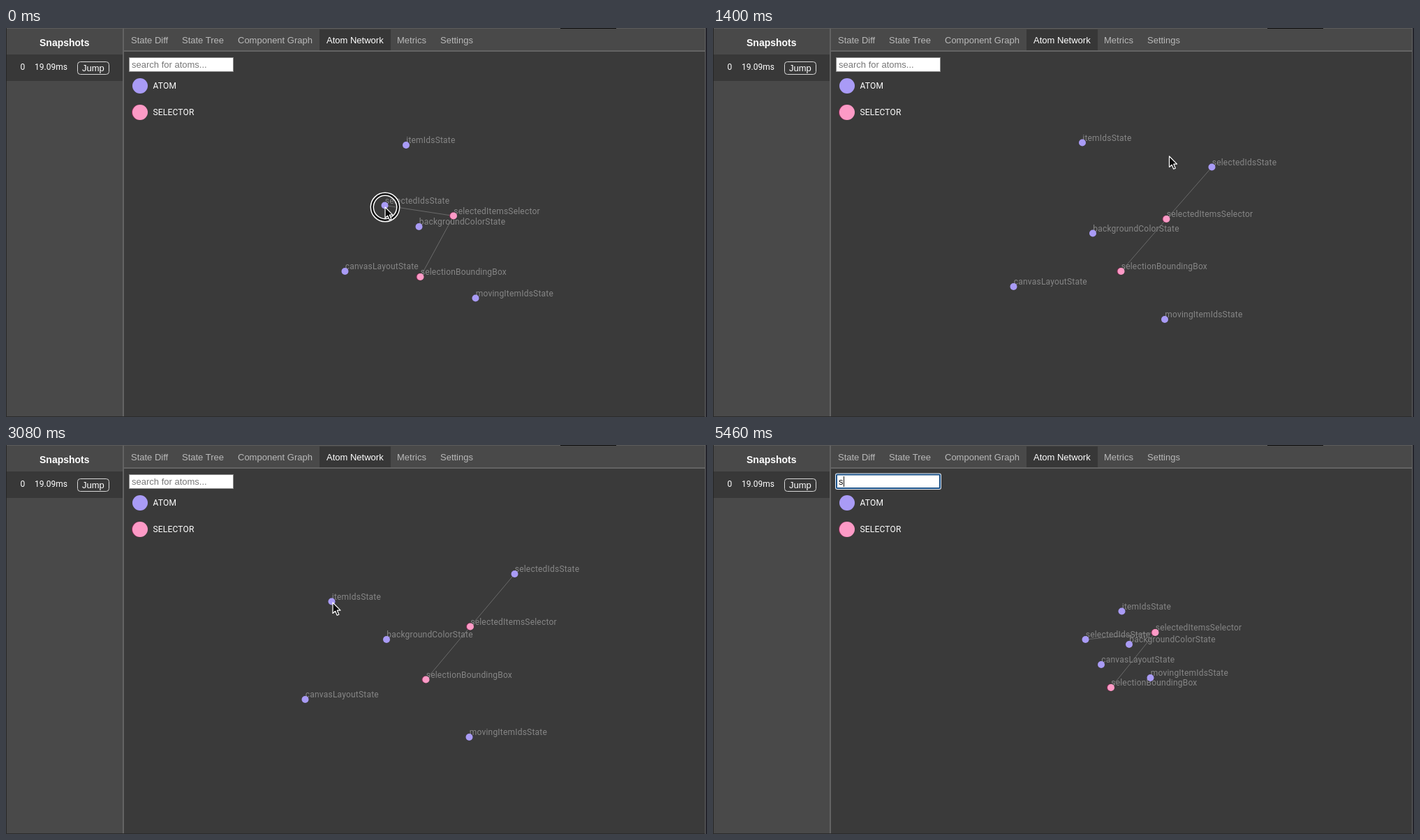
Recreate the animation shown at these times as an HTML page. Size 1004 px wide and 558 px high, loop 5530 ms.

```html
<!DOCTYPE html>
<html lang="en">
<head>
<meta charset="utf-8">
<title>Atom Network</title>
<style>
html, body { margin: 0; width: 100%; height: 100%; overflow: hidden; background: #3a3a3a; }
svg { display: block; width: 1004px; height: 558px; }
text { font: 13px "Liberation Sans", Arial, sans-serif; fill: #b9b9b9; white-space: pre; }
.on { fill: #fff; }
.head { font-weight: bold; font-size: 14px; fill: #fff; }
.small, .label { font: 12px Roboto, "Liberation Sans", sans-serif; fill: #fff; }
.key, .label { letter-spacing: .2px; }
.label { fill: #868686; }
.hint { fill: #777; }
.typed { fill: #111; }
.edge { stroke: #6a6a6a; stroke-width: 1; }
.atom { fill: #a99bf6; }
.sel { fill: #fd9ac6; }
.shade { fill: #8c2c58; }
</style>
</head>
<body>
<svg viewBox="0 0 1004 558">
  <rect width="1004" height="558" fill="#3a3a3a"/>
  <rect width="168" height="558" fill="#494949"/>
  <rect y="38" width="168" height="38" fill="#383838"/>
  <rect x="168" width="834" height="33" fill="#494949"/>
  <rect x="449" y="2" width="102" height="31" fill="#373737"/>
  <rect x="168" y="32" width="834" height="2" fill="#636363"/>
  <rect x="167" width="2" height="558" fill="#636363"/>
  <rect width="1004" height="1" fill="#5c5c5c"/>
  <rect x="794" width="80" height="1" fill="#0c0c0c"/>
  <rect width="1" height="558" fill="#262626"/>
  <rect y="557" width="1004" height="1" fill="#2b2b2b"/>
  <rect x="1001" width="1" height="558" fill="#636363"/>
  <rect x="1002" width="2" height="558" fill="#25252c"/>

  <text class="head" x="48" y="25.500">Snapshots</text>
  <text class="small" x="20.500" y="60">0</text>
  <text class="small" x="41" y="60">19.09ms</text>
  <rect x="102.500" y="48.500" width="45" height="18" rx="4" fill="#383838" stroke="#d8d8d8"/>
  <text class="on" x="109" y="62">Jump</text>

  <text x="179" y="21.500">State Diff</text>
  <text x="252" y="21.500">State Tree</text>
  <text x="332" y="21.500">Component Graph</text>
  <text class="on" x="459" y="21.500">Atom Network</text>
  <text x="560" y="21.500">Metrics</text>
  <text x="622" y="21.500">Settings</text>

  <g id="focus">
    <rect x="175" y="40.500" width="152" height="23.500" rx="3" fill="#e6eef8"/>
    <rect x="176" y="41.500" width="150" height="21.500" rx="2" fill="#1c5288"/>
  </g>
  <rect id="box" x="176.500" y="42.500" width="149" height="20" fill="#fff" stroke="#8a8a8a"/>
  <text id="hint" class="hint" x="180" y="57">search for atoms...</text>
  <text id="typed" class="typed" x="180" y="57">s</text>
  <rect id="caret" y="45" width="1" height="15" fill="#111"/>

  <circle class="atom" cx="192" cy="83" r="11"/>
  <text class="small key" x="210.500" y="87.300">ATOM</text>
  <circle class="shade" cx="191" cy="121" r="11"/>
  <circle class="sel" cx="192" cy="121" r="11"/>
  <text class="small key" x="210.500" y="125.300">SELECTOR</text>

  <g id="graph"></g>

  <g id="pointer">
    <g id="ring" fill="none">
      <circle r="18.800" stroke="#0a0a0a" stroke-width="5"/>
      <circle r="20.700" stroke="#fff" stroke-width="1.500"/>
      <circle r="16.700" stroke="#fff" stroke-width="1.500"/>
    </g>
    <path id="arrow" d="M0 0V15.500L3.600 12.300L6.200 18.200L8.800 17.100L6.300 11.200H11Z" fill="#0a0a0a" stroke="#fff" stroke-width="1.200" stroke-linejoin="round"/>
    <path id="beam" d="M-3 -7Q0 -7 0 -5Q0 -7 3 -7M0 -5V5M-3 7Q0 7 0 5Q0 7 3 7M-1.500 1H1.500" fill="none" stroke="#111" stroke-width="1.200"/>
  </g>
</svg>
<script>
const LOOP = 5530, STEP = 70, RESET = 5320, FOCUS = 4060;
const $ = id => document.getElementById(id);

// Positions at TIMES, then the spot reached after the layout restarts.
const TIMES = [0, 840, 1400, 2520, 3080, 4340];
const nodes = [
  { name: 'itemIdsState', x: [573, 539, 529, 526.5, 466.5, 460], y: [168, 165, 164.5, 159, 224.5, 219], end: [585.5, 238.5] },
  { name: 'selectedIdsState', x: [542.5, 713.5, 714.5, 717, 728.5, 732], y: [254.5, 192.5, 199.5, 198, 185, 183], end: [533.5, 279] },
  { name: 'backgroundColorState', x: [591.5, 556.5, 544, 539, 545, 542], y: [285, 290, 294.5, 292.5, 279, 277], end: [596, 286] },
  { name: 'canvasLayoutState', x: [485.5, 445.5, 430.5, 424, 428.5, 421], y: [349, 360.5, 371, 374, 365, 369], end: [556, 315] },
  { name: 'movingItemIdsState', x: [672.5, 648.5, 647, 651, 663.5, 667.5], y: [387.5, 403, 418, 425, 419, 426.5], end: [626.5, 334] },
  { name: 'selectedItemsSelector', sel: true, x: [641, 635, 649.5, 652.5, 665, 669], y: [269.5, 289, 274, 273, 260.5, 259], end: [633.5, 269] },
  { name: 'selectionBoundingBox', sel: true, x: [593.5, 565.5, 584.5, 589, 601.5, 606.5], y: [357, 366, 349, 348.5, 336.5, 336], end: [570, 348] }
];
const links = [[1, 5], [5, 6]];
const hub = [586, 292];

const mouse = {
  t: [0, 840, 1120, 1400, 2380, 2520, 3080, 3220, 3850],
  x: [543, 716.5, 717, 653.5, 529.5, 528.5, 468, 468, 235],
  y: [257, 194.5, 198, 184, 165, 162, 226, 226, 48]
};
const presses = [[0, 1120], [2400, 3010], [FOCUS, 4200]];

// Monotone cubic through the points, flat at both ends.
function curve(ts, vs, t) {
  const last = ts.length - 1;
  if (t >= ts[last]) return vs[last];
  const rise = i => (vs[i + 1] - vs[i]) / (ts[i + 1] - ts[i]);
  const slope = i => {
    if (i === 0 || i === last) return 0;
    const a = rise(i - 1), b = rise(i);
    return a * b > 0 ? 2 * a * b / (a + b) : 0;
  };
  let i = 0;
  while (t >= ts[i + 1]) i++;
  const h = ts[i + 1] - ts[i], u = (t - ts[i]) / h, w = 1 - u;
  return vs[i] * (1 + 2 * u) * w * w + vs[i + 1] * u * u * (3 - 2 * u)
    + h * u * w * (slope(i) * w - slope(i + 1) * u);
}

function add(tag, attrs, text) {
  const el = document.createElementNS('http://www.w3.org/2000/svg', tag);
  set(el, attrs);
  if (text) el.textContent = text;
  return $('graph').appendChild(el);
}
function set(el, attrs) {
  for (const k in attrs) el.setAttribute(k, attrs[k]);
}
function show(id, on) {
  $(id).style.display = on ? '' : 'none';
}

const lines = links.map(() => add('line', { class: 'edge' }));
const labels = nodes.map(n => add('text', { class: 'label' }, n.name));
const shades = nodes.map(n => n.sel && add('circle', { class: 'shade', r: 5 }));
const dots = nodes.map(n => add('circle', { class: n.sel ? 'sel' : 'atom', r: 5 }));

function place(n, t) {
  if (t < RESET) return [curve(TIMES, n.x, t), curve(TIMES, n.y, t)];
  const left = Math.max(0, 1 - (t - RESET) / 140);
  const spread = 1 - 0.5 * left * left;
  return n.end.map((v, i) => hub[i] + (v - hub[i]) * spread);
}

function draw(t) {
  const spots = nodes.map(n => place(n, t));
  spots.forEach(([x, y], i) => {
    set(dots[i], { cx: x, cy: y });
    if (shades[i]) set(shades[i], { cx: x - 1, cy: y });
    set(labels[i], { x: x + 0.3, y: y - 3 });
  });
  links.forEach(([a, b], i) => set(lines[i], {
    x1: spots[a][0], y1: spots[a][1], x2: spots[b][0], y2: spots[b][1]
  }));

  const mx = curve(mouse.t, mouse.x, t), my = curve(mouse.t, mouse.y, t);
  const typed = t >= RESET, focused = t >= FOCUS;
  const over = mx > 176 && mx < 326 && my > 42 && my < 63;
  set($('pointer'), { transform: `translate(${mx} ${my})` });
  show('pointer', !typed);
  show('ring', presses.some(([a, b]) => t >= a && t < b));
  show('arrow', !over);
  show('beam', over);

  show('focus', focused);
  set($('box'), focused
    ? { x: 178, y: 43.5, width: 146, height: 17.5, stroke: 'none' }
    : { x: 176.5, y: 42.5, width: 149, height: 20, stroke: '#8a8a8a' });
  show('hint', !typed);
  show('typed', typed);
  show('caret', typed || focused && (t - FOCUS) % 1000 < 500);
  set($('caret'), { x: typed ? 187 : 180 });
}

const start = performance.now();
function tick() {
  const t = (performance.now() - start) % LOOP;
  draw(Math.floor(t / STEP) * STEP);
  requestAnimationFrame(tick);
}
tick();
</script>
</body>
</html>
```
